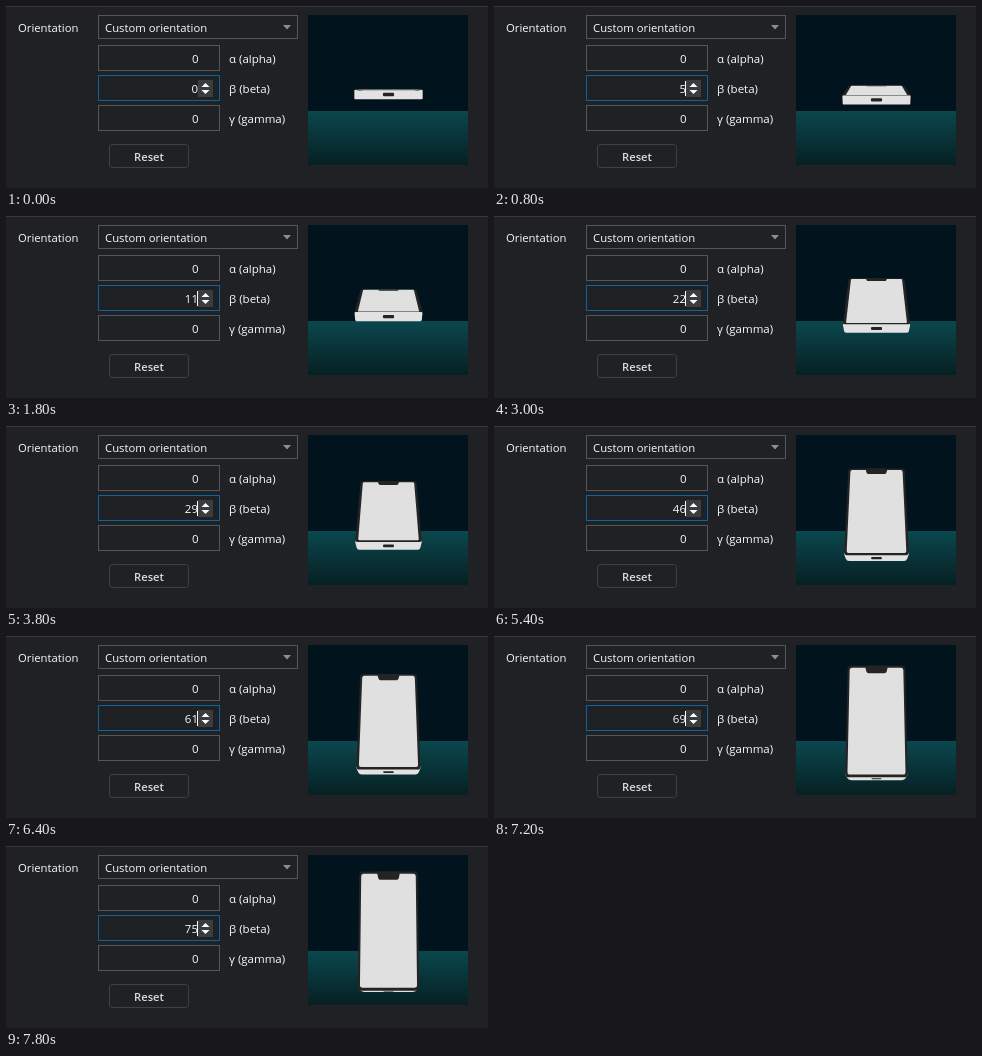
Write an HTML page that moves like this. It is 482 px wide and 182 px high and loops after 8000 ms.

```html
<!DOCTYPE html>
<html lang="en">
<head>
<meta charset="utf-8">
<title>Orientation</title>
<style>
  html, body { margin: 0; width: 100%; height: 100%; overflow: hidden; background: #202124; }
  svg { display: block; width: 482px; height: 182px; }
  text { font: 500 11.3px "Open Sans", "Noto Sans", sans-serif; fill: #fafafa; }
  .value { text-anchor: end; font-size: 11.5px; }
  .label { font-size: 11.5px; }
  .action { text-anchor: middle; font-weight: 600; font-size: 11.2px; fill: #dcdcdc; }
  .box { fill: #202124; stroke: #53565a; }
  .focus { stroke: #0e639c; }
  .button { stroke: #3f4145; }
  .case { fill: #e2e2e2; }
  .glass { fill: #242424; }
  .screen { fill: #e0e0e0; }
</style>
</head>
<body>
<svg viewBox="0 0 482 182">
  <defs>
    <linearGradient id="ground" x2="0" y2="1">
      <stop stop-color="#0b474e"/>
      <stop offset="1" stop-color="#062023"/>
    </linearGradient>
  </defs>
  <rect width="482" height="1" fill="#37393c"/>

  <text x="12" y="25.5">Orientation</text>
  <rect class="box" x="92.5" y="9.5" width="199" height="23"/>
  <text x="99" y="25.5">Custom orientation</text>
  <path d="M277 19h8l-4 4.5z" fill="#8b8e92"/>

  <rect class="box" x="92.5" y="39.5" width="121" height="25"/>
  <rect class="box focus" x="92.5" y="69.5" width="121" height="25"/>
  <rect class="box" x="92.5" y="99.5" width="121" height="25"/>
  <text class="value" x="192.5" y="56.5">0</text>
  <text class="value" x="192" y="86.5" id="beta">0</text>
  <text class="value" x="192.5" y="116.5">0</text>
  <rect x="192" y="74" width="15" height="17" fill="#3b3c3e"/>
  <path d="M195.5 81h8l-4-4zM195.5 84h8l-4 4z" fill="#fff"/>
  <rect id="caret" x="191" y="75" width="1" height="15" fill="#fff"/>
  <text class="label" x="223" y="56.5">α (alpha)</text>
  <text class="label" x="223" y="86.5">β (beta)</text>
  <text class="label" x="223" y="116.5">γ (gamma)</text>

  <rect class="box button" x="103.5" y="138.5" width="79" height="23" rx="3"/>
  <text class="action" x="143" y="154.5">Reset</text>

  <rect x="302" y="9" width="160" height="96" fill="#01141d"/>
  <rect x="302" y="105" width="160" height="54" fill="url(#ground)"/>
  <path id="case" class="case"/>
  <path id="glass" class="glass"/>
  <path id="screen" class="screen"/>
  <path id="notch" class="glass"/>
  <path id="port" class="glass"/>
</svg>
<script>
const LOOP = 8000, STEP = 200;
const CENTER = { x: 382.5, y: 88.5 }, CAMERA = 600;
// Half sizes of the phone
const WIDTH = 30.7, LENGTH = 61, DEPTH = 4.2;

// [time, degrees]; the preview trails the typed value near the end
const betaKeys = [[0, 0], [1800, 11], [4400, 34], [5400, 46], [6400, 61], [7800, 75]];
const pitchKeys = [[0, 0], [1800, 11], [5400, 45], [6400, 51], [7800, 76]];

const $ = id => document.getElementById(id);

function valueAt(keys, t) {
  const i = Math.max(1, keys.findIndex(key => key[0] >= t));
  const [t0, v0] = keys[i - 1], [t1, v1] = keys[i];
  return v0 + (v1 - v0) * (t - t0) / (t1 - t0);
}

// x across, y along the phone, z out of its screen
function project(x, y, z, pitch) {
  const sin = Math.sin(pitch), cos = Math.cos(pitch);
  const scale = CAMERA / (CAMERA + y * cos - z * sin);
  const rise = 4 * sin;
  return [CENTER.x + x * scale, CENTER.y - rise - (y * sin + z * cos) * scale];
}

function roundedPath(points, radius) {
  const toward = (p, q) => {
    const k = Math.min(.45, radius / (Math.hypot(q[0] - p[0], q[1] - p[1]) || 1));
    return [p[0] + (q[0] - p[0]) * k, p[1] + (q[1] - p[1]) * k];
  };
  const n = points.length;
  return points.map((p, i) => {
    const start = toward(p, points[(i + n - 1) % n]);
    const end = toward(p, points[(i + 1) % n]);
    return `${i ? 'L' : 'M'}${start}Q${p} ${end}`;
  }).join('') + 'Z';
}

function draw(t) {
  const pitch = valueAt(pitchKeys, t) * Math.PI / 180;
  const tilt = Math.sin(pitch);
  const radius = 4 * tilt;

  // Each shape is a symmetric quad: [half width, y, z] of its two ends
  const quad = (id, far, near, r) => {
    const corner = (side, [x, y, z]) => project(side * x, y, z, pitch);
    const points = [corner(-1, far), corner(1, far), corner(1, near), corner(-1, near)];
    $(id).setAttribute('d', roundedPath(points, r));
  };

  quad('case', [WIDTH, -LENGTH + 5 * tilt, DEPTH], [WIDTH - 4 * tilt, -LENGTH, -DEPTH], 1 + 2 * tilt);
  quad('glass', [WIDTH - tilt, LENGTH, DEPTH], [WIDTH - tilt, -LENGTH, DEPTH], radius);
  quad('screen', [WIDTH - 3, LENGTH - 2.5, DEPTH], [WIDTH - 3, 2.8 - LENGTH, DEPTH], radius * .7);
  quad('notch', [12, LENGTH, DEPTH], [10, LENGTH - 9, DEPTH], 2 * tilt);
  quad('port', [5, -LENGTH, 1.5], [5, -LENGTH, -1.5], 1);

  $('beta').textContent = Math.round(valueAt(betaKeys, t));
  $('caret').style.visibility = t % 4400 < STEP ? 'hidden' : 'visible';
}

function tick() {
  draw(Math.floor(performance.now() % LOOP / STEP) * STEP);
  requestAnimationFrame(tick);
}
tick();
</script>
</body>
</html>
```
